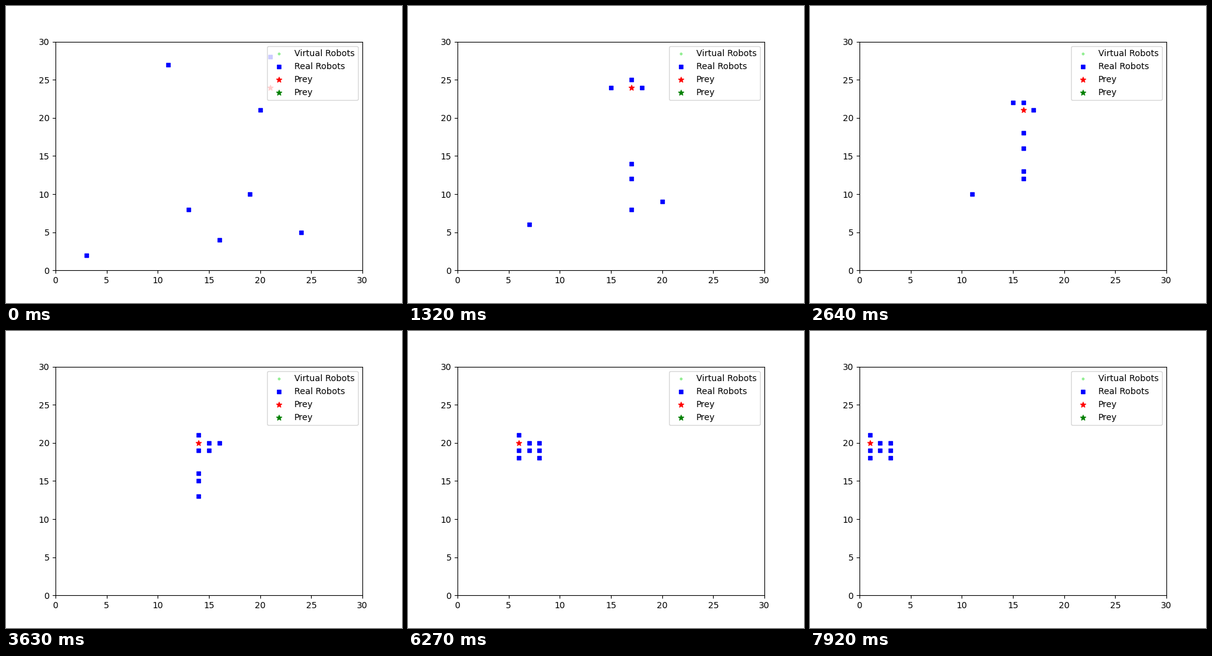
These frames come from a looping animation (640x480 px, 8000 ms). A matplotlib script:

```python
import matplotlib.pyplot as plt
import numpy as np
from matplotlib.animation import FuncAnimation

LOOP = 8000      # ms
STEP = 330       # ms per simulation step
INTERVAL = 40    # ms per drawn frame
SIZE = 30

# Listed in the order in which the robots take their turns
START = [(20, 21), (21, 28), (11, 27), (19, 10),
         (13, 8), (24, 5), (16, 4), (3, 2)]


def sign(v):
    return (v > 0) - (v < 0)


def prey_at(k):
    """Flees left, dodges downwards, then flees left again."""
    x = 21 - min(k, 5) - max(0, k - 9)
    y = 24 - min(max(k - 5, 0), 4)
    return x, y


def next_cell(robot, prey, taken):
    """One step towards the prey: diagonal first, then along one axis."""
    x, y = robot
    dx, dy = prey[0] - x, prey[1] - y
    touching = max(abs(dx), abs(dy)) == 1
    if touching and dx > 0:
        return robot  # already ahead of the prey: hold the block

    across, along = (x + sign(dx), y), (x, y + sign(dy))
    options = [(x + sign(dx), y + sign(dy))]
    if abs(dx) > abs(dy):
        options += [across, along]
    elif abs(dx) < abs(dy) or touching:
        options += [along, across]
    else:
        options += [along]
    return next((c for c in options if c not in taken), robot)


def simulate(steps):
    robots = list(START)
    history = [list(robots)]
    for k in range(1, steps):
        prey = prey_at(k)
        for i, robot in enumerate(robots):
            robots[i] = next_cell(robot, prey, {prey, *robots})
        history.append(list(robots))
    return np.array(history)


history = simulate(LOOP // STEP + 1)

fig, ax = plt.subplots(figsize=(6.4, 4.8), dpi=100)
ax.set_xlim(0, SIZE)
ax.set_ylim(0, SIZE)

ax.scatter([], [], s=20, c="lightgreen", marker=".", label="Virtual Robots")
robot_dots = ax.scatter([], [], s=20, c="blue", marker="s", label="Real Robots")
prey_star = ax.scatter([], [], s=40, c="red", marker="*", label="Prey")
ax.scatter([], [], s=40, c="green", marker="*", label="Prey")
ax.legend(loc="upper right")


def update(frame):
    k = (frame * INTERVAL + INTERVAL - 10) // STEP
    k = min(k, len(history) - 1)
    robot_dots.set_offsets(history[k])
    prey_star.set_offsets([prey_at(k)])
    return robot_dots, prey_star


anim = FuncAnimation(fig, update, frames=LOOP // INTERVAL,
                     interval=INTERVAL, repeat=True, repeat_delay=0)
plt.show()
```
